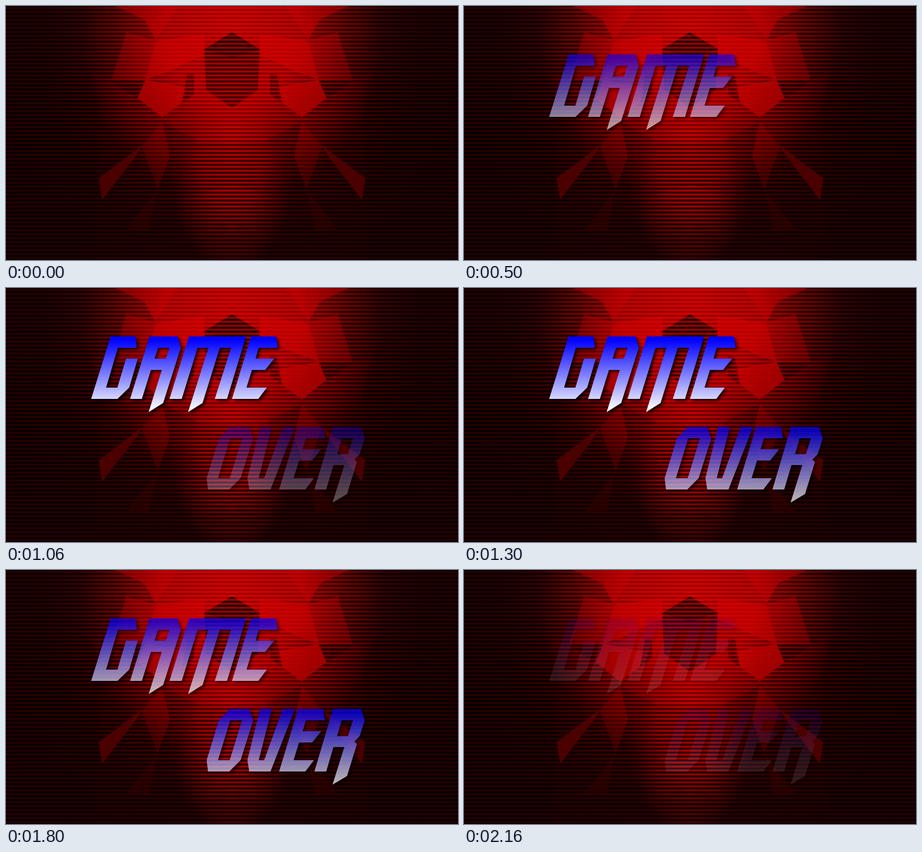
An HTML page with a canvas for the animation above (2220 ms loop, 998 by 561 pixels).

```html
<!DOCTYPE html>
<html lang="en">
<head>
<meta charset="utf-8">
<title>Game over</title>
<style>
html, body { margin: 0; width: 100%; height: 100%; overflow: hidden; background: #000; }
canvas, svg { position: absolute; left: 0; top: 0; width: 998px; height: 561px; }
g { filter: drop-shadow(4px 4px 3px rgba(0, 0, 0, .8)); fill: url(#blue); fill-rule: evenodd; opacity: 0; }
</style>
</head>
<body>
<canvas id="back" width="998" height="561"></canvas>
<svg viewBox="0 0 998 561" role="img" aria-label="GAME OVER">
  <linearGradient id="blue" gradientUnits="userSpaceOnUse" x1="0" y1="114" x2="0" y2="270">
    <stop stop-color="#00f"/><stop offset="1" stop-color="#fff"/>
  </linearGradient>
  <g id="game">
    <path d="M231 107H286L289 132H247L221 220H246L265 156H291L272 220 246 245H188Z"/>
    <path d="M317 107H379L386 132 347 254 315 274 344 181H320L300 245H274ZM336 132H361L353 156H328Z"/>
    <path d="M404 107H530L488 245H461L497 132H472L434 254 402 274 447 132H423L388 245H361Z"/>
    <path id="e" d="M541 107H596L600 132H558L551 156H592L572 181H543L531 220H576L557 245H499Z"/>
  </g>
  <g id="over" transform="translate(0 200)">
    <path d="M494 107H537L546 132 518 220 493 245H446L443 220 470 132ZM495 132H521L494 220H468Z"/>
    <path d="M561 107H587L558 220H570L611 107H638L584 245H537L533 220Z"/>
    <use href="#e" x="104"/>
    <path d="M722 107H784L792 132 781 167 769 179 775 184 753 255 721 274 747 191H723L707 245H681ZM741 132H766L755 167H731Z"/>
  </g>
</svg>
<script>
const W = 998, H = 561, LOOP = 2220, LINES = 64;
const game = document.getElementById('game'), over = document.getElementById('over');
const c = document.getElementById('back').getContext('2d');

// Left halves of the facets, mirrored when drawn; a negative tone darkens.
const facets = [
  [-.4, '0 0 240 0 265 60 232 165 190 145 210 235 195 561 0 561'],
  [.35, '240 0 380 0 330 75 305 30'],
  [-.3, '240 0 305 30 330 75 265 58'],
  [.2, '265 58 330 76 307 164 232 165'],
  [.6, '330 78 438 62 438 108 350 148 307 163'],
  [.65, '307 163 400 180 388 216 345 246 290 203'],
  [-.6, '232 165 307 165 291 203 262 188'],
  [-.55, '415 150 400 151 388 216 345 246 415 195'],
  [-.7, '499 58 438 95 442 185 499 225'],
  [-.6, '499 58 438 95 499 115'],
  [-.4, '499 300 430 300 345 255 362 330 335 405 400 425 499 394'],
  [.2, '345 255 362 330 335 405 300 310'],
  [.3, '300 308 286 332 212 428 205 380'],
  [.1, '335 405 330 420 316 495 265 495'],
  [-.4, '478 480 499 500 499 530 430 520'],
];

function drawFacets(strength) {
  for (const [tone, points] of facets) {
    const n = points.split(' ').map(Number);
    c.fillStyle = `rgba(${tone > 0 ? 205 : 0},0,0,${Math.abs(tone) * strength})`;
    for (const mirror of [false, true]) {
      c.beginPath();
      for (let i = 0; i < n.length; i += 2) c.lineTo(mirror ? W - n[i] : n[i], n[i + 1]);
      c.fill();
    }
  }
}

// Red elliptical light; levels are [distance, red].
function glow(cy, rx, ry, levels, top = 0, height = H) {
  const g = c.createRadialGradient(0, 0, 0, 0, 0, 1);
  for (const [at, red] of levels) g.addColorStop(at, `rgb(${red},0,0)`);
  c.save();
  c.translate(W / 2, cy);
  c.scale(rx, ry);
  c.fillStyle = g;
  c.fillRect(-W / 2 / rx, (top - cy) / ry, W / rx, height / ry);
  c.restore();
}

function drawBack() {
  glow(30, 340, 420, [[0, 150], [.45, 130], [.75, 42], [1, 4]]);
  drawFacets(1);

  // Scan lines shine over the facets.
  c.globalCompositeOperation = 'lighten';
  for (let y = 0; y < H; y++) {
    c.globalAlpha = (1 + Math.cos((y - 4) / H * LINES * 2 * Math.PI)) / 2;
    glow(60, 510, 560, [[0, 225], [.3, 200], [.53, 125], [.65, 70], [.8, 46], [1, 24]], y, 1);
    glow(300, 150, 290, [[0, 205], [.5, 165], [1, 40]], y, 1);
  }
  c.globalCompositeOperation = 'source-over';
  c.globalAlpha = 1;
  drawFacets(.22);
}

// Rises by a tenth every 60 ms.
const fade = (t, start) => Math.min(10, Math.max(0, Math.floor((t - start) / 60) + 1)) / 10;

function frame() {
  const t = performance.now() % LOOP;
  const out = fade(t, 1680);
  game.style.opacity = fade(t, 200) - out;
  over.style.opacity = fade(t, 940) - out;
  requestAnimationFrame(frame);
}

drawBack();
frame();
</script>
</body>
</html>
```
